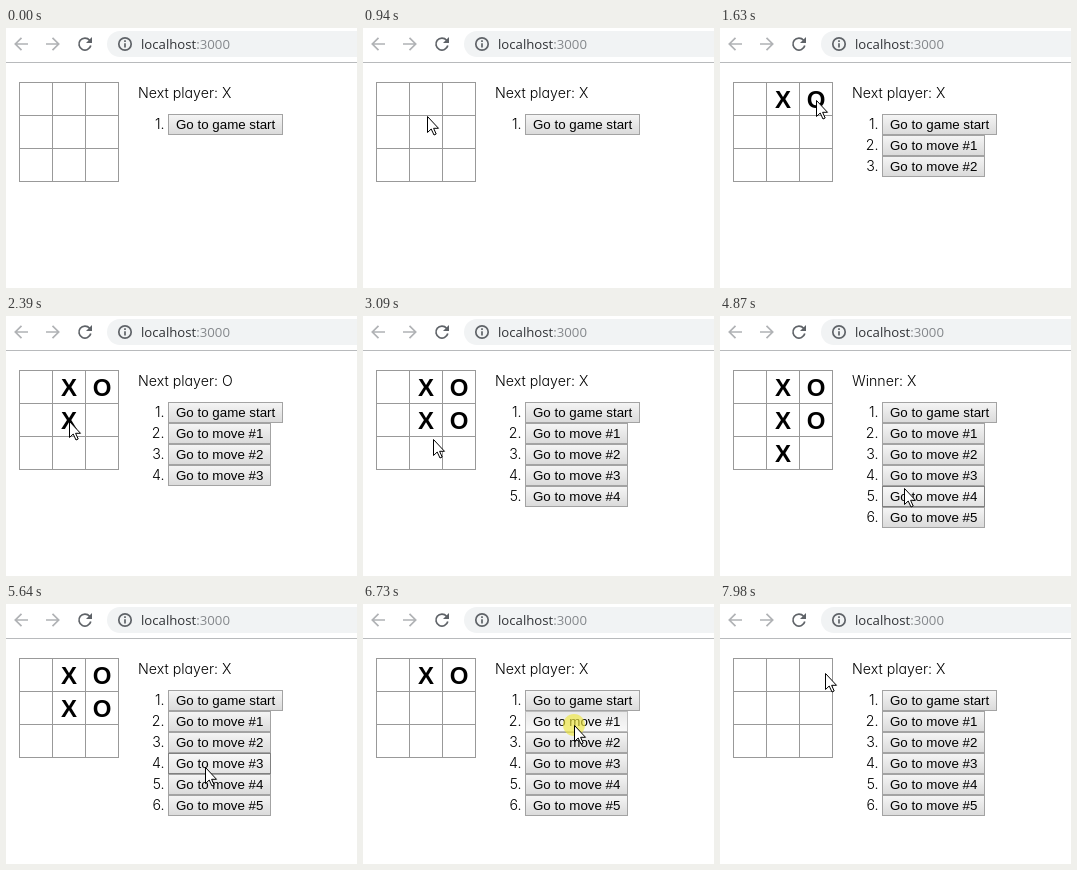
An HTML page that plays this animation: 351x260 px, repeating every 8000 ms.

```html
<!DOCTYPE html>
<html lang="en">
<head>
<meta charset="utf-8">
<title>Tic-tac-toe</title>
<style>
  html, body { margin: 0; width: 100%; height: 100%; overflow: hidden; background: #fff; }
  svg { display: block; width: 351px; height: 260px; }
  .url { font: 13.2px "Open Sans", sans-serif; fill: #303236; }
  .url tspan { fill: #85888c; }
  .body { font: 300 14.2px Inter, sans-serif; font-feature-settings: "cv11"; fill: #000; }
  .number { text-anchor: end; }
  .label { font: 13.333px "Liberation Sans", Arial, sans-serif; fill: #000; }
  .mark { font: bold 24px "Liberation Sans", Arial, sans-serif; text-anchor: middle; }
  .button rect { fill: url(#face); stroke: #a3a3a3; }
  .button.hover rect { fill: url(#lit); stroke: #808080; }
  .button.pressed rect { fill: url(#sunk); stroke: #bcbcbc; }
  .icon { fill: none; stroke: #5f6368; stroke-width: 1.7; }
  .off { stroke: #b0b2b5; }
</style>
</head>
<body>
<svg id="stage" viewBox="0 0 351 260">
  <defs>
    <linearGradient id="face" x2="0" y2="1">
      <stop stop-color="#f5f5f5"/><stop offset="1" stop-color="#dadada"/>
    </linearGradient>
    <linearGradient id="lit" x2="0" y2="1">
      <stop stop-color="#f8f8f8"/><stop offset="1" stop-color="#e2e2e2"/>
    </linearGradient>
    <linearGradient id="sunk" x2="0" y2="1">
      <stop stop-color="#e9e9e9"/><stop offset="1" stop-color="#f8f8f8"/>
    </linearGradient>
  </defs>
  <path class="icon off" d="M22 16H9.5M15.5 9.8L9.3 16l6.2 6.2"/>
  <path class="icon off" d="M40 16h12.5M46.5 9.8l6.2 6.2-6.2 6.2"/>
  <path class="icon" d="M83.6 12.2A6 6 0 1 0 84.8 17.5"/>
  <path fill="#5f6368" d="M86 9v6h-6z"/>
  <path fill="#f1f3f4" d="M351 3H114a13 13 0 0 0 0 26H351z"/>
  <circle class="icon" cx="119" cy="16" r="6.2"/>
  <path class="icon" d="M119 12.3v1.6M119 15.2v4.4"/>
  <path stroke="#b8babc" d="M0 34.5H351"/>
  <text class="url" x="135" y="21">localhost<tspan>:3000</tspan></text>
  <path id="grid" fill="none" stroke="#999"/>
  <text id="status" class="body" x="132" y="69.5"></text>
</svg>
<script>
const LOOP = 8000, ENTER = 300, STEP = 70;
const PRESS = 80, PAUSE = 100, WIN_PAUSE = 790;
const CELL = 33, ROW = 21;

// Five moves are played, then the history is walked back to the start
const moves = [[1, 0], [2, 0], [1, 1], [2, 1], [1, 2]];
const clicks = [985, 1510, 2260, 2760, 3530, 5240, 5960, 6250, 6730, 7280];

const player = i => i % 2 ? "O" : "X";
const cellPoint = ([col, row]) => [30 + CELL * col, 72 + CELL * row];
const buttonPoint = i => [217 - 6 * i, 100 + ROW * i];

const points = [
  [150, 216],
  ...moves.map(cellPoint),
  ...moves.map((_, i) => buttonPoint(4 - i)),
  [105, 69]
];

// One trip between each pair of points; longer ways take longer
const trips = points.slice(1).map((to, i) => {
  const from = points[i];
  const pause = i === moves.length ? WIN_PAUSE : PAUSE;
  const depart = i ? clicks[i - 1] + PRESS + pause : ENTER;
  const duration = 100 + 3.5 * Math.hypot(to[0] - from[0], to[1] - from[1]);
  const arrive = Math.min(depart + duration, clicks[i] ?? LOOP);
  return { from, to, depart, arrive };
});

const stage = document.getElementById("stage");
const statusLine = document.getElementById("status");

function add(parent, tag, attrs, text = "") {
  const node = document.createElementNS("http://www.w3.org/2000/svg", tag);
  for (const key in attrs) node.setAttribute(key, attrs[key]);
  node.textContent = text;
  return parent.appendChild(node);
}

const show = (node, visible) => node.setAttribute("visibility", visible ? "visible" : "hidden");

document.getElementById("grid").setAttribute("d", [0, 1, 2, 3].map(i =>
  `M13 ${54.5 + CELL * i}h100M${13.5 + CELL * i} 54v100`).join(""));

const marks = moves.map(([col, row], i) =>
  add(stage, "text", { class: "mark", x: 30 + CELL * col, y: 80 + CELL * row }, player(i)));

const buttons = Array.from({ length: moves.length + 1 }, (_, i) => {
  const top = 86 + ROW * i, width = i ? 103 : 115;
  const node = add(stage, "g", { class: "button" });
  add(node, "text", { class: "body number", x: 158.5, y: top + 15 }, `${i + 1}.`);
  add(node, "rect", { x: 162.5, y: top + 0.5, width: width - 1, height: ROW - 1 });
  add(node, "text", { class: "label", x: 170, y: top + 15 }, i ? `Go to move #${i}` : "Go to game start");
  return { node, top, width };
});

const glow = add(stage, "circle", { r: 11, fill: "#eee63c", "fill-opacity": 0.65 });
const pointer = add(stage, "path", {
  d: "M.5.5V16.5L4.2 13 7 19 9.2 18 6.6 12.3H11.5z", fill: "#fff", stroke: "#000"
});

// Sideways motion leads, vertical motion follows evenly
function tipAt(t) {
  const { from, to, depart, arrive } = trips.findLast(trip => trip.depart <= t) ?? trips[0];
  const k = Math.min(1, Math.max(0, (t - depart) / (arrive - depart)));
  const lead = 1 - (1 - k) ** 2;
  return [from[0] + (to[0] - from[0]) * lead, from[1] + (to[1] - from[1]) * k].map(Math.round);
}

function draw(t) {
  const done = clicks.filter(at => t >= at + PRESS).length;
  const total = Math.min(done, moves.length);
  const step = Math.min(done, clicks.length - done);
  const pressed = clicks.some(at => t >= at && t < at + PRESS);
  const entered = t >= ENTER;
  const [x, y] = tipAt(Math.floor(t / STEP) * STEP);

  statusLine.textContent = step === moves.length ? "Winner: X" : `Next player: ${player(step)}`;
  marks.forEach((mark, i) => show(mark, i < step));
  buttons.forEach(({ node, top, width }, i) => {
    const over = entered && x >= 162 && x < 162 + width && y >= top && y < top + ROW;
    show(node, i <= total);
    node.classList.toggle("hover", over);
    node.classList.toggle("pressed", over && pressed);
  });

  for (const node of [glow, pointer]) node.setAttribute("transform", `translate(${x} ${y})`);
  show(pointer, entered);
  show(glow, pressed);
}

const origin = performance.now();
function tick() {
  draw((performance.now() - origin) % LOOP);
  requestAnimationFrame(tick);
}
tick();
</script>
</body>
</html>
```
